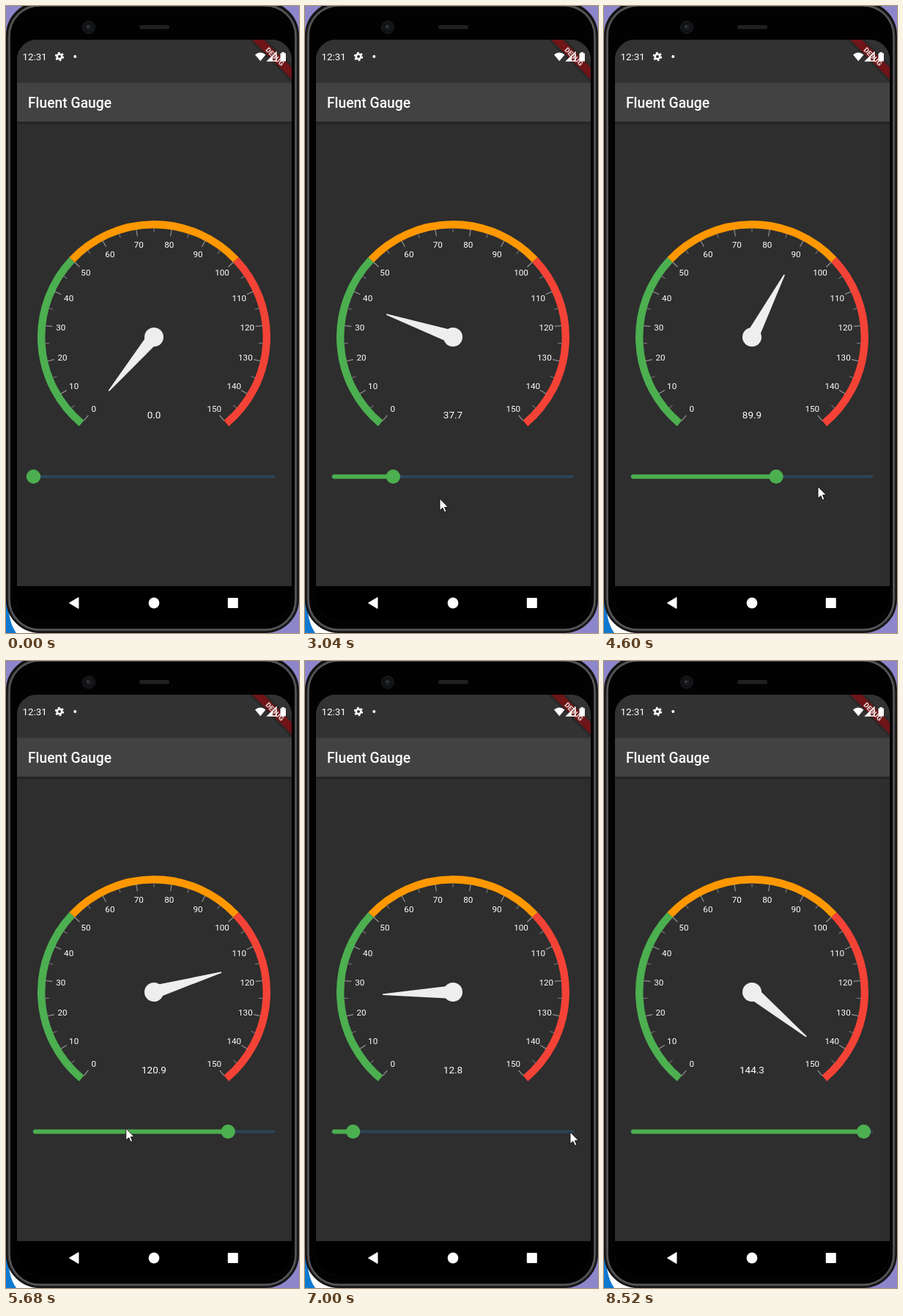
Recreate the animation shown at these times as an HTML page. Size 400x856 px, loop 9920 ms.

```html
<!DOCTYPE html>
<html lang="en">
<head>
<meta charset="utf-8">
<title>Fluent Gauge</title>
<style>
  html, body { margin: 0; width: 100%; height: 100%; overflow: hidden; background: #000; }
  svg { display: block; width: 400px; height: 856px; font-family: Roboto, sans-serif; fill: #fff; }
  .mid { text-anchor: middle; }
</style>
</head>
<body>
<svg viewBox="0 0 400 856">
  <defs>
    <clipPath id="screen"><rect x="15" y="46" width="375" height="792" rx="27"/></clipPath>
    <linearGradient id="shade" x2="0" y2="1">
      <stop stop-opacity=".3"/><stop offset="1" stop-opacity="0"/>
    </linearGradient>
  </defs>

  <!-- phone body -->
  <rect width="400" height="856" fill="#8e86cb"/>
  <path d="M0 800H40V856H0Z"/>
  <path d="M0 800H3Q1 838 14 856H0Z" fill="#0f78d0"/>
  <rect x="1" y="-5" width="398" height="860" rx="45" fill="#050506" stroke="#161618" stroke-width="2"/>
  <rect x="4" y="-1" width="392" height="853" rx="42" fill="#020203" stroke="#48484b" stroke-width="3"/>
  <rect x="5" y="0" width="390" height="851" rx="41" fill="none" stroke="#77777a" stroke-width=".8"/>
  <circle cx="113" cy="29" r="8.5" fill="#111214" stroke="#1d1e21"/>
  <circle cx="113" cy="29" r="4" fill="#1b1c20"/>
  <circle cx="112" cy="28" r="1.5" fill="#44464d"/>
  <rect x="182" y="26" width="41" height="5.5" rx="2.7" fill="#202022"/>

  <g clip-path="url(#screen)">
    <path d="M15 46H390V838H15Z" fill="#2e2e2e"/>
    <path d="M15 46H390V105H15Z" fill="#323232"/>
    <path d="M15 105H390V158H15Z" fill="#424242"/>
    <path d="M15 158H390V163H15Z" fill="url(#shade)"/>
    <path d="M15 792H390V838H15Z" fill="#000"/>
    <path d="M336 46H352L390 84V100Z" fill="#6f1417" stroke="#000" stroke-opacity=".2" stroke-width="6" paint-order="stroke"/>
    <text class="mid" transform="translate(367 69) rotate(45)" y="3.4" font-size="9.7" font-weight="900" fill="#e0cccc">DEBUG</text>
  </g>

  <!-- status bar -->
  <text x="22.5" y="74" font-size="13.4">12:31</text>
  <circle cx="73" cy="69" r="3.3" fill="none" stroke="#fff" stroke-width="2.6"/>
  <circle cx="73" cy="69" r="5.2" fill="none" stroke="#fff" stroke-width="2" stroke-dasharray="2.7 2.745"/>
  <circle cx="94.3" cy="69" r="2"/>
  <path d="M340 66.5Q347.3 60.5 354.5 66.5L347.3 75.3Z"/>
  <path d="M357 75L369 63V75Z" fill="none" stroke="#fff" stroke-width="1.3"/>
  <path d="M357 75L364 68.5V75Z"/>
  <path d="M374.5 64.5H376.5V63H380V64.5H382V75.5H374.5Z"/>
  <text x="30" y="139" font-size="19.3" font-weight="500">Fluent Gauge</text>

  <g id="dial" fill="none"></g>
  <text id="readout" class="mid" x="202" y="563.3" font-size="13.5"></text>
  <path id="needle" d="M0 -9L96 -.8V.8L0 9Z" fill="#eee"/>
  <circle cx="202" cy="452" r="13" fill="#eee"/>

  <!-- slider -->
  <rect x="36" y="640.6" width="331.5" height="3.8" rx="1.9" fill="#2b4559"/>
  <rect id="fill" x="37" y="639.6" height="5.8" rx="2.9" fill="#4caf50"/>
  <circle id="halo" cy="642.5" fill="#4caf50" opacity=".14"/>
  <circle id="thumb" cy="642.5" r="9.7" fill="#4caf50"/>

  <!-- navigation bar -->
  <path d="M86.5 815L99 807.5V822.5Z" stroke="#fff" stroke-linejoin="round"/>
  <circle cx="202" cy="815" r="7.4"/>
  <rect x="302.8" y="808" width="14" height="14" rx="1"/>

  <path id="cursor" d="M0 0V16.3L3.9 12.8L6.4 18.5L9 17.4L6.5 11.8H11.5Z" stroke="#000" stroke-width=".9"/>
</svg>
<script>
const LOOP = 9920, CX = 202, CY = 452;
const el = id => document.getElementById(id);
const set = (id, name, value) => el(id).setAttribute(name, value);
const clamp = p => Math.max(0, Math.min(1, p));
const lerp = (a, b, p) => a + (b - a) * p;
const easeOut = (p, power) => 1 - (1 - p) ** power;
const angle = v => 130 + v / 150 * 280;
const slideX = v => 37.5 + v * 2.197;
const polar = (v, r) => {
  const a = angle(v) * Math.PI / 180;
  return [CX + r * Math.cos(a), CY + r * Math.sin(a)];
};

// taps on the slider; span is the needle's travel time
const taps = [
  { at: 2280, value: 37.7, span: 1050 },
  { at: 3140, value: 67, span: 860 },
  { at: 4045, value: 89.9, span: 700 },
  { at: 5290, value: 120.9, span: 960 },
  { at: 6560, value: 12.8, span: 870 },
  { at: 7560, value: 144.3, span: 960 }
];

// the pointer wanders between these points and rests at each tap
const wander = [
  [720, 378, 702], [1400, 40, 646], [2040, 40, 646], [3040, 184, 673], [4000, 256, 686],
  [4600, 292, 656], [5680, 164, 638], [7000, 362, 643], [8480, 402, 659]
];
const rests = taps.flatMap(({ at, value }) => [at, at + 80].map(t => [t, slideX(value), 648]));
const path = [...wander, ...rests].sort((a, b) => a[0] - b[0]);

function pointer(t) {
  const i = path.findIndex(k => k[0] > t);
  if (i < 1) return null;
  const [a, b] = [path[i - 1], path[i]];
  const p = easeOut((t - a[0]) / (b[0] - a[0]), 2);
  return [lerp(a[1], b[1], p), lerp(a[2], b[2], p)];
}

// each tap picks the needle up wherever it is
function needleValue(t, n) {
  if (n < 0) return 0;
  const { at, value, span } = taps[n];
  return lerp(needleValue(at, n - 1), value, easeOut(clamp((t - at) / span), 3));
}

function buildDial() {
  let out = '';
  ['#4caf50', '#ff9800', '#f44336'].forEach((color, i) => {
    out += `<path d="M${polar(i * 50, 153.8)}A153.8 153.8 0 0 1 ${polar(i * 50 + 50, 153.8)}" stroke="${color}" stroke-width="10.4"/>`;
  });
  for (let v = 0; v <= 150; v += 5) {
    const major = v % 10 === 0;
    out += `<path d="M${polar(v, 149)}L${polar(v, major ? 139.5 : 143)}" stroke="${major ? '#999' : '#777'}" stroke-width="1.1"/>`;
    if (major) {
      const [x, y] = polar(v, 128);
      out += `<text class="mid" x="${x}" y="${y + 4.2}" font-size="11.7" fill="#fff">${v}</text>`;
    }
  }
  el('dial').innerHTML = out;
}

function draw(t) {
  const n = taps.filter(tap => tap.at <= t).length - 1;
  const rest = { at: -LOOP, value: 0 };
  const now = taps[n] || rest, before = taps[n - 1] || rest;
  const age = t - now.at;
  const x = lerp(slideX(before.value), slideX(now.value), clamp(age / 75));

  el('readout').textContent = now.value.toFixed(1);
  set('needle', 'transform', `translate(${CX} ${CY}) rotate(${angle(needleValue(t, n))})`);
  set('thumb', 'cx', x);
  set('fill', 'width', x - 37);
  set('halo', 'cx', x);
  set('halo', 'r', 24 * Math.min(clamp(age / 100), clamp((280 - age) / 100)));

  const tip = pointer(t);
  set('cursor', 'visibility', tip ? 'visible' : 'hidden');
  if (tip) set('cursor', 'transform', `translate(${tip})`);
}

buildDial();
function tick() {
  draw(performance.now() % LOOP);
  requestAnimationFrame(tick);
}
tick();
</script>
</body>
</html>
```
